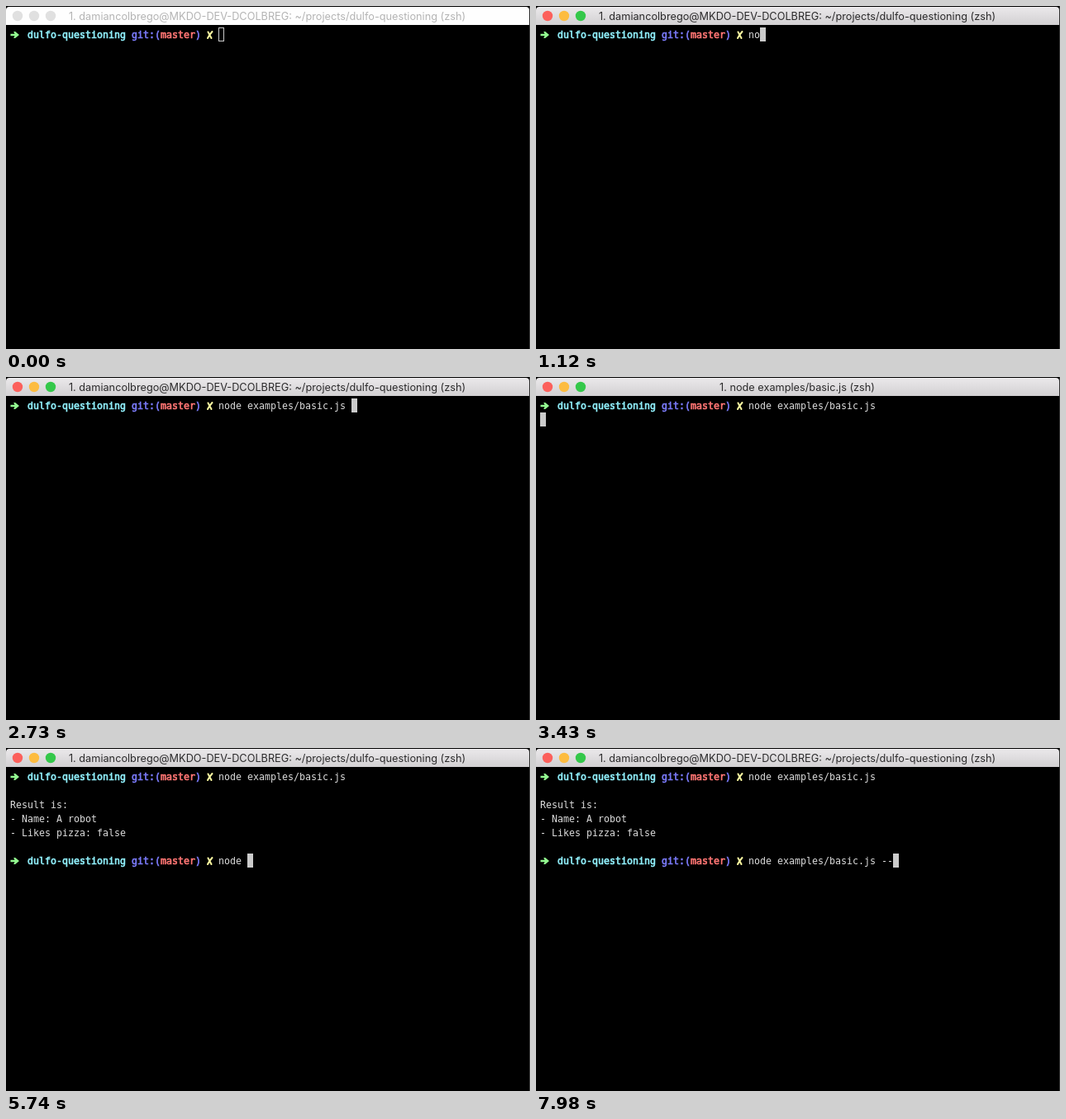
Animation of 634 by 416 pixels, one loop 8000 ms. Source, as an HTML page:

```html
<!DOCTYPE html>
<html lang="en">
<head>
<meta charset="utf-8">
<title>Terminal</title>
<style>
  html, body { margin: 0; width: 100%; height: 100%; overflow: hidden; background: #000; }
  svg { display: block; width: 634px; height: 416px; }
  text { white-space: pre; }
  .mono { font: 11.63px "DejaVu Sans Mono", monospace; fill: #dcdcdc; }
  .bold { stroke-width: .65; }
  #title { font: 12.72px Inter, sans-serif; text-anchor: middle; }
</style>
</head>
<body>
<svg viewBox="0 0 634 416" xmlns="http://www.w3.org/2000/svg">
  <defs>
    <linearGradient id="chrome" x1="0" y1="0" x2="0" y2="1">
      <stop offset="0" stop-color="#ebe9eb"/>
      <stop offset="1" stop-color="#d2d0d2"/>
    </linearGradient>
  </defs>
  <rect width="634" height="416"/>
  <rect x="633" width="1" height="416" fill="#303030"/>
  <path id="bar" d="M0 23V5Q0 1 4 1H629Q633 1 633 5V23Z"/>
  <g id="lights"></g>
  <text id="title" x="316" y="17"></text>
  <g id="screen"></g>
  <rect id="cursor"/>
  <g id="beam" fill="none" stroke-linecap="round">
    <path d="M-3.5 -7.5Q-.5 -7.5 0 -5.5Q.5 -7.5 3.5 -7.5M0 -5.5V5.5M-3.5 7.5Q-.5 7.5 0 5.5Q.5 7.5 3.5 7.5M-1.5 2.5H1.5" stroke="#d8d8d8" stroke-width="1.2"/>
  </g>
</svg>
<script>
const LOOP = 8000, CELL = 7, LINE = 17, LEFT = 5, TOP = 26, INPUT = 36;
const NS = "http://www.w3.org/2000/svg";
const $ = id => document.getElementById(id);

const project = "dulfo-questioning";
const command = "node examples/basic.js ";
const idleTitle = `1. damiancolbrego@MKDO-DEV-DCOLBREG: ~/projects/${project} (zsh)`;
const busyTitle = "1. node examples/basic.js (zsh)";

const FOCUS = 210, ENTER = 3080, BUSY = 3150, OUTPUT = 3570, READY = 3640;

// [time, number of characters typed]; larger jumps are tab completion
const firstRun = [[910, 1], [1050, 2], [1190, 3], [1330, 4], [1540, 5], [1820, 6],
                  [2100, 14], [2520, 15], [2660, 23]];
const secondRun = [[5040, 1], [5180, 2], [5320, 3], [5460, 4], [5670, 5], [5810, 6],
                   [6020, 14], [6790, 15], [6930, 23], [7770, 24], [7910, 25]];

function set(el, attrs) {
  for (const key in attrs) el.setAttribute(key, attrs[key]);
}

function add(parent, tag, attrs, text) {
  const el = document.createElementNS(NS, tag);
  set(el, attrs);
  if (text) el.textContent = text;
  parent.appendChild(el);
  return el;
}

function write(parent, col, row, text, color) {
  const attrs = { x: LEFT + col * CELL, y: TOP + row * LINE + 13, class: "mono" };
  if (color) {
    attrs.class += " bold";
    attrs.style = `fill:${color};stroke:${color}`;
  }
  return add(parent, "text", attrs, text);
}

function prompt(row) {
  const g = add($("screen"), "g", {});
  const y = TOP + row * LINE + 9;
  add(g, "path", {
    d: `M5.5 ${y - 1.2}H10.5L9.2 ${y - 4}H11.2L16 ${y}L11.2 ${y + 4}H9.2L10.5 ${y + 1.2}H5.5Z`,
    fill: "#94fb91"
  });
  write(g, 3, row, project, "#92f3ff");
  write(g, 21, row, "git:(", "#7b7bfb");
  write(g, 26, row, "master", "#ff7674");
  write(g, 32, row, ")", "#7b7bfb");
  add(g, "path", {
    d: `M244.5 ${y - 3.5}L248.5 ${y + 4}M249.5 ${y - 4}Q246 ${y} 244 ${y + 4}`,
    fill: "none", stroke: "#fbf9a0", "stroke-width": 2, "stroke-linecap": "round"
  });
  return { g, input: write(g, INPUT, row, "") };
}

const lights = ["#fc605b", "#fdbc40", "#34c84a"].map((fill, i) => ({
  fill, el: add($("lights"), "circle", { cx: 14 + i * 20, cy: 12, r: 6.2 })
}));

const first = prompt(0);
const output = add($("screen"), "g", {});
["Result is:", "- Name: A robot", "- Likes pizza: false"]
  .forEach((line, i) => write(output, 0, 2 + i, line));
const second = prompt(6);

function typed(keys, t) {
  let count = 0;
  for (const [at, n] of keys) if (t >= at) count = n;
  return count;
}

function show(el, on) {
  el.setAttribute("visibility", on ? "visible" : "hidden");
}

function drawChrome(t) {
  const active = t >= FOCUS;
  $("bar").setAttribute("fill", active ? "url(#chrome)" : "#fefefe");
  for (const { el, fill } of lights) el.setAttribute("fill", active ? fill : "#e0e0e0");
  $("title").textContent = t >= BUSY && t < READY ? busyTitle : idleTitle;
  $("title").setAttribute("fill", active ? "#2c2b2c" : "#b4b4b4");
}

function drawCursor(t, a, b) {
  let col = INPUT + a, row = 0;
  if (t >= READY) [col, row] = [INPUT + b, 6];
  else if (t >= OUTPUT) [col, row] = [0, 6];
  else if (t >= ENTER) [col, row] = [0, 1];
  const x = LEFT + col * CELL, y = TOP + row * LINE;
  if (t >= FOCUS) {
    set($("cursor"), { x, y, width: CELL, height: LINE, fill: "#cbcbcb", stroke: "none" });
  } else {
    set($("cursor"), { x: x + .5, y: y + .5, width: CELL - 1, height: LINE - 1, fill: "none", stroke: "#cbcbcb" });
  }
}

function drawBeam(t) {
  const p = Math.min(1, Math.max(0, (t - 70) / 210));
  const y = 379 + 24 * (1 - p) ** 2;
  $("beam").setAttribute("transform", `translate(333.5 ${y})`);
  show($("beam"), t >= 70 && t < firstRun[0][0]);
}

function render(t) {
  const a = typed(firstRun, t), b = typed(secondRun, t);
  first.input.textContent = command.slice(0, a);
  second.input.textContent = (command + "--").slice(0, b);
  show(output, t >= OUTPUT);
  show(second.g, t >= READY);
  drawChrome(t);
  drawCursor(t, a, b);
  drawBeam(t);
}

let start;
function tick(now) {
  if (start === undefined) start = now;
  render((now - start) % LOOP);
  requestAnimationFrame(tick);
}
render(0);
requestAnimationFrame(tick);
</script>
</body>
</html>
```
